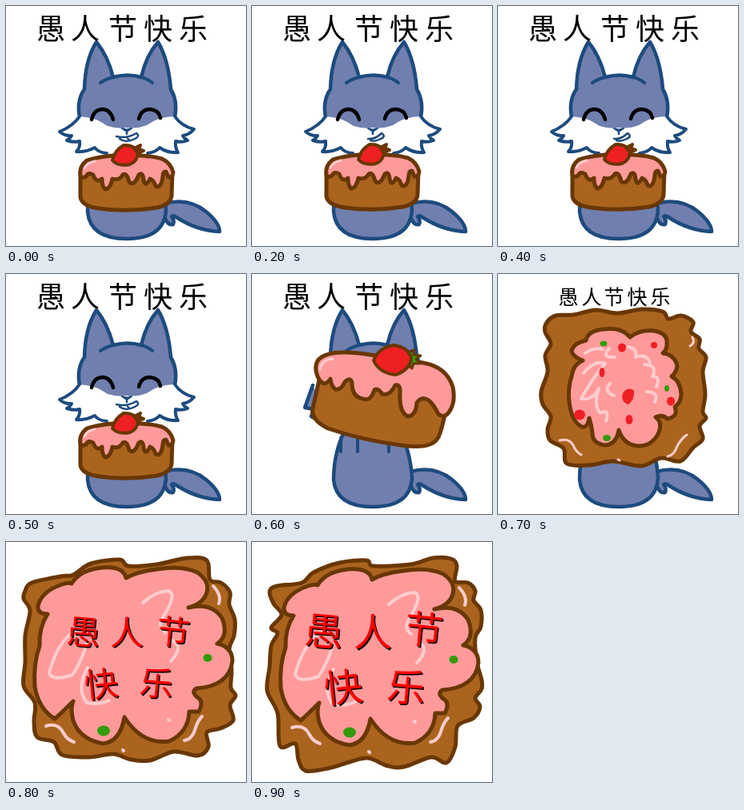
Recreate the animation shown at these times as an HTML page. Size 300x300 px, loop 1.4 s.

```html
<!DOCTYPE html>
<html lang="zh">
<head>
<meta charset="utf-8">
<style>
  html, body { margin: 0; width: 100%; height: 100%; overflow: hidden; background: #fff; }
  svg { display: block; width: 100vw; height: 100vh; }
  g[id] { visibility: hidden; }
  path { stroke-linecap: round; stroke-linejoin: round; fill: none; }
  text { font-family: "Noto Sans CJK SC", "Noto Sans CJK", sans-serif; text-anchor: middle; }
  .cat { fill: #707fae; stroke: #1d4b7e; stroke-width: 4.5; }
  .white { fill: #fff; }
  .ink { stroke: #1d4b7e; stroke-width: 4; }
  .mouth { fill: #fff; stroke: #1d4b7e; stroke-width: 2.5; }
  .eye { stroke: #000; stroke-width: 4.5; }
  .crust { fill: #aa641e; stroke: #693703; stroke-width: 5; }
  .icing { fill: #ff9a9b; stroke: #693703; stroke-width: 5; }
  .shine { stroke: #ffcdcd; stroke-width: 4; }
  .thin { stroke-width: 3; }
  .berry { fill: #ee2023; stroke: #693703; stroke-width: 4; }
  .red { fill: #ee2023; }
  .green { fill: #339b0b; }
</style>
</head>
<body>
<svg viewBox="0 0 300 300">
  <g id="body">
    <path class="cat" d="M198 247Q228 239 250 257Q267 271 267 282Q239 281 213 264Q210 261 207 263Q211 268 209 273Q202 275 198 263"/>
    <path class="cat" d="M119 190Q102 220 102 257Q105 291 151 291Q198 291 200 255Q198 218 181 190Z"/>
  </g>
  <g id="head">
    <path class="cat" d="M92 139Q88 118 98 104Q99 67 113 45Q127 62 134 89Q152 84 169 89Q175 62 190 45Q203 67 206 104Q215 119 211 139L190 165H112Z"/>
    <path class="ink" d="M118 96Q125 91 134 89M169 89Q177 91 183 96"/>
  </g>
  <g id="face">
    <path class="white" d="M92 138Q112 139 127 150Q140 154 151 152Q163 154 176 149Q191 138 211 138L235 154L222 164L226 169L212 170L214 183L190 178L176 187H127L111 177L89 183L92 170L77 168L82 163L67 157Z"/>
    <path class="ink" d="M92 138Q84 150 67 157Q74 163 82 162Q80 166 76 168Q85 171 92 169Q93 177 88 182Q100 183 111 177Q115 183 126 184M211 138Q219 150 235 154Q229 161 221 162Q223 166 227 168Q220 171 212 169Q211 177 215 183Q202 184 192 177Q187 183 177 184"/>
    <path class="eye" d="M107 142Q110 129 121 129Q131 130 134 142M166 141Q169 129 180 129Q191 130 193 140"/>
    <path class="ink" style="fill:#1d4b7e;stroke-width:2" d="M145 153Q151 156 157 153L151 157Z"/>
  </g>
  <g id="grin"><path class="mouth" d="M138 163Q152 166 163 159Q168 163 161 166Q150 172 142 166M151 157V160M151 164L154 168"/></g>
  <g id="smile"><path class="mouth" d="M145 166Q154 167 162 159Q168 163 161 166Q153 170 148 168M151 157V160"/></g>

  <g id="cake">
    <path class="crust" d="M93 208L93 239Q95 250 116 253Q152 258 189 252Q206 248 207 237L208 207Z"/>
    <path class="icing" d="M93 212Q91 201 101 193Q119 187 151 186Q182 187 195 191Q206 196 209 208Q208 215 203 214L200 207Q196 207 196 213Q194 229 187 225Q185 218 180 216Q174 228 172 217Q171 207 166 211Q160 226 154 220Q151 208 146 211Q141 219 133 216Q130 229 124 229Q120 226 120 216Q113 222 109 211Q103 207 100 213Q95 216 93 212Z"/>
    <path class="shine thin" d="M98 203Q101 196 111 194"/>
    <path class="berry" d="M133 193Q136 180 147 174Q159 173 165 182Q165 194 155 198Q140 201 133 193Z"/>
    <path class="berry thin" d="M160 178L168 174L166 179L172 181L165 184Z"/>
  </g>

  <g id="bigcake">
    <path class="cat" d="M76 139L66 167L77 169L74 178L83 183L88 187L99 187"/>
    <path class="ink" d="M111 205V222M132 207V222M171 204V222"/>
    <path class="crust" d="M86 123L76 168Q73 182 95 193Q135 207 186 214Q225 220 233 204Q238 193 242 170L245 145Z"/>
    <path class="icing" d="M84 132Q76 117 83 107Q93 97 119 98Q143 99 163 104L214 111Q243 116 251 141Q255 161 246 173Q240 181 233 175Q227 163 221 158Q212 152 206 161Q205 177 195 178Q184 173 185 150Q186 137 179 139Q172 153 163 150Q157 142 153 145Q148 160 139 156Q125 154 125 136Q123 128 116 135Q111 146 104 144Q99 140 98 131Q91 142 84 132Z"/>
    <path class="shine thin" d="M85 119Q87 107 101 106"/>
    <path class="green" style="stroke:#693703;stroke-width:3" d="M193 98L203 95L202 101L211 102L205 106L210 112L202 112L200 118L193 113Z"/>
    <path class="berry" d="M152 108Q158 92 177 89Q195 91 199 105Q198 119 180 126Q159 124 152 108Z"/>
  </g>

  <g id="splat">
    <path class="crust" data-points="60 62 72 52 94 51 122 45 149 49 180 44 206 47 213 56 229 52 244 60 241 72 252 81 251 93 260 104 256 122 259 150 256 172 260 180 252 190 256 206 244 217 228 234 204 230 179 240 144 234 114 239 86 237 82 218 65 208 62 194 66 178 56 163 54 147 62 122 59 102 66 87 59 73"/>
    <path class="icing" d="M92 96Q95 86 110 83Q112 71 132 69Q155 66 165 79Q177 69 195 71Q212 74 211 86Q212 94 206 99Q221 101 224 115Q223 123 217 128Q228 134 229 150Q229 161 221 166Q226 178 212 181Q205 175 197 179Q206 185 201 198Q193 215 176 215Q157 214 151 195Q148 213 134 214Q118 212 118 199Q117 189 114 180Q112 193 105 191Q92 185 89 160Q87 143 92 128Q94 113 106 108Q94 104 92 96Z"/>
    <path class="shine" d="M109 99Q120 91 131 94M107 124Q120 107 134 112Q116 133 104 156Q119 158 126 143Q119 164 128 174Q140 168 135 184M139 93Q128 105 146 104M140 137Q131 147 145 152M163 91Q175 94 172 104Q185 99 190 110M183 113Q200 114 193 128Q204 128 198 141M186 147Q202 148 196 160"/>
    <path class="shine thin" d="M240 90Q247 86 243 79M77 208Q89 205 94 214Q97 222 104 226M212 228Q220 227 224 215Q229 206 236 201M150 232L152 233"/>
    <path class="red" d="M156 149Q163 140 170 146Q171 157 163 163Q153 160 156 149Z"/>
    <g class="red"><ellipse cx="155" cy="92" rx="5" ry="5.5"/><ellipse cx="195" cy="89" rx="4" ry="4"/><ellipse cx="130" cy="123" rx="3.5" ry="6"/><ellipse cx="102" cy="176" rx="7" ry="6.5"/><ellipse cx="164" cy="182" rx="4.5" ry="6"/><ellipse cx="216" cy="159" rx="5" ry="5.5"/></g>
    <g class="green"><ellipse cx="132" cy="87" rx="4.5" ry="3.5"/><ellipse cx="211" cy="143" rx="3" ry="4"/><ellipse cx="136" cy="205" rx="5" ry="4"/></g>
  </g>

  <g id="crustNear"><path class="crust" data-points="24 61 32 51 68 43 84 41 106 27 142 22 153 30 188 28 226 20 251 23 255 47 269 51 280 63 279 78 286 97 285 117 279 134 282 160 281 182 287 192 280 204 284 223 268 233 251 238 253 256 240 267 210 262 180 273 156 272 134 265 104 269 70 266 60 250 39 244 35 225 36 201 22 180 24 150 24 117 30 86 22 71"/></g>
  <g id="crustFull"><path class="crust" data-points="22 62 31 55 62 51 77 38 109 26 143 23 152 30 198 28 226 20 249 21 256 30 254 49 270 51 279 61 277 73 286 85 286 106 279 120 281 150 287 172 287 184 279 195 285 206 277 220 257 230 254 256 243 276 224 269 190 281 170 280 145 270 122 275 95 283 67 286 58 272 54 252 35 255 32 214 19 186 22 156 24 130 32 114 24 107 37 91 27 77"/></g>
  <g id="closeup">
    <path class="icing" d="M40 82Q44 64 70 55Q78 52 82 54Q92 37 120 34Q147 32 150 47Q164 39 189 36Q220 31 239 40Q255 51 251 65Q247 79 228 84Q257 77 270 97Q279 119 264 129Q283 133 283 151Q279 182 238 185Q231 189 239 196Q248 201 241 214L229 214Q228 240 204 251Q171 256 148 221Q143 251 122 254Q92 249 84 225Q80 210 84 201Q69 216 61 223Q41 211 36 183Q34 154 42 132Q41 109 52 92Q39 92 40 82Z"/>
    <path class="shine" d="M171 78Q186 64 203 63Q214 67 198 93Q188 108 199 115M93 109Q66 121 54 165Q57 177 83 168Q95 151 101 128M102 159Q87 185 101 203Q116 206 129 200M208 125Q223 133 206 151"/>
    <path class="shine" d="M259 57Q270 69 266 79M50 232Q65 227 72 241Q76 249 85 252M223 250Q233 249 237 234Q240 225 245 220M203 224L204 225M146 262L147 263"/>
    <g class="green"><path d="M107 68Q110 59 120 59Q123 69 115 71Q109 73 107 68Z"/><ellipse cx="252" cy="147" rx="5.5" ry="5"/><ellipse cx="122" cy="238" rx="8" ry="6.5"/></g>
  </g>
  <g id="title"></g>
  <g id="smallTitle"></g>
  <g id="redNear"></g>
  <g id="redFull"></g>
</svg>
<script>
const $ = id => document.getElementById(id);
const words = [..."愚人节快乐"];

// Closed smooth curve through the points (Catmull-Rom)
function smooth(numbers) {
  const count = numbers.length / 2;
  const at = i => [0, 1].map(axis => numbers[(i + count) % count * 2 + axis]);
  const handle = (p, a, b) => p.map((v, axis) => v + (b[axis] - a[axis]) / 6);
  let d = "M" + at(0);
  for (let i = 0; i < count; i++) {
    const from = at(i), to = at(i + 1);
    d += "C" + [handle(from, at(i - 1), to), handle(to, at(i + 2), from), to].join(" ");
  }
  return d + "Z";
}
document.querySelectorAll("[data-points]").forEach(path =>
  path.setAttribute("d", smooth(path.dataset.points.split(" ").map(Number))));

// Each place is [centre x, centre y, tilt]
function letter(id, size, places, colour, shift = 0) {
  places.forEach(([x, y, tilt = 0], i) => {
    $(id).innerHTML += `<text transform="translate(${x + shift} ${y + shift}) rotate(${tilt})" y="${size * .38}"
      font-size="${size}" font-weight="500" fill="${colour}">${words[i]}</text>`;
  });
}
function redLetter(id, size, places) {
  letter(id, size, places, "#000", 1.5);
  letter(id, size, places, "#f00");
}

letter("title", 36, [56, 99, 146, 190, 234].map(x => [x, 28]), "#000");
letter("smallTitle", 25, [88, 117, 145, 174, 203].map(x => [x, 28]), "#000");
redLetter("redNear", 42, [[97, 112, 5], [151, 113], [209, 112, 6], [119, 177, -6], [188, 176, 5]]);
redLetter("redFull", 48, [[90, 111, 5], [151, 112], [215, 109, 6], [114, 181, -6], [193, 181, 5]]);

const giggle = "body head face cake title";
const scenes = [
  [0, giggle + " grin"],
  [200, giggle + " smile"],
  [300, giggle + " grin"],
  [400, giggle + " smile"],
  [500, giggle + " grin"],
  [600, "body head bigcake title"],
  [700, "body splat smallTitle"],
  [800, "crustNear closeup redNear"],
  [900, "crustFull closeup redFull"]
];
const layers = document.querySelectorAll("g[id]");

function draw(time) {
  const shown = scenes.findLast(scene => scene[0] <= time)[1].split(" ");
  layers.forEach(layer => layer.style.visibility = shown.includes(layer.id) ? "visible" : "hidden");
  $("cake").setAttribute("transform", `translate(0 ${shown.includes("smile") ? -1 : 0})`);
  $("closeup").setAttribute("transform", `translate(0 ${time < 900 ? -2 : 0})`);
}
const start = performance.now();
function tick() {
  draw((performance.now() - start) % 1400);
  requestAnimationFrame(tick);
}
tick();
</script>
</body>
</html>
```
